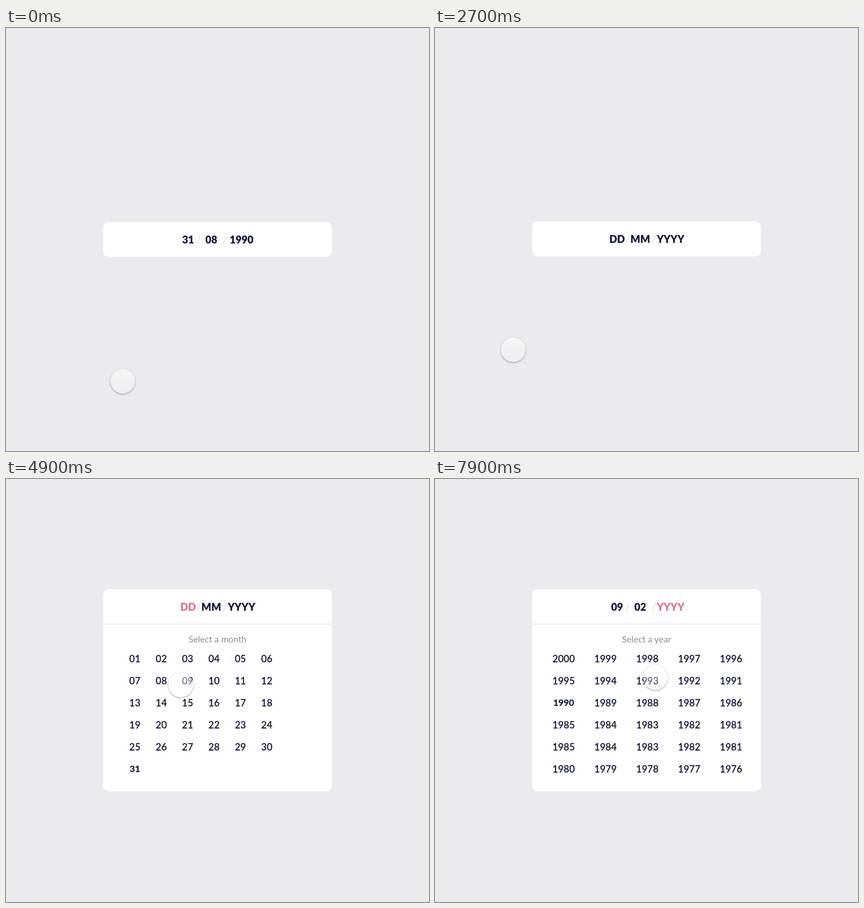
An HTML page for the animation above (8 s loop, 748x748 px).

```html
<!DOCTYPE html>
<html lang="en">
<head>
<meta charset="utf-8">
<title>Date picker</title>
<style>
:root { --ink: #12172f; --pink: #e2708a; }
html, body { margin: 0; width: 100%; height: 100%; overflow: hidden; background: #ebeaec; }
svg { display: block; width: 100vw; height: 100vh; }
text { font-family: Lato, "Open Sans", sans-serif; text-anchor: middle; fill: var(--ink); }

.card { fill: #fefdff; x: 171.5px; width: 405px; rx: 10px; animation: grow 8s infinite; }
.head { animation: lift 8s infinite; }
.head text { font-size: 18.2px; font-weight: 900; }
.head .slash { font-weight: 400; fill: #dcdbe0; }
@keyframes grow {
  0%, 29.99% { y: 343px; height: 62px; }
  30%, 41.875% { y: 342px; height: 62px; animation-timing-function: ease; }
  51.25%, 100% { y: 195px; height: 357.3px; }
}
@keyframes lift {
  0%, 29.99% { transform: translateY(343px); }
  30%, 41.875% { transform: translateY(342px); animation-timing-function: ease; }
  51.25%, 100% { transform: translateY(195px); }
}

/* header fields: hard swaps of text, soft changes of colour */
.past { animation: past 8s step-end infinite; }
.blank { animation: blank 8s step-end infinite; }
.dd { animation: dd 8s step-end infinite, ddTint 8s linear infinite; }
.day { animation: day 8s step-end infinite, dayTint 8s linear infinite; }
.mm { animation: mm 8s step-end infinite, mmTint 8s linear infinite; }
.month { animation: month 8s step-end infinite, monthTint 8s linear infinite; }
.yyyy { animation: yearTint 8s linear infinite; }
@keyframes past { 0% { opacity: 1; } 22.5%, 100% { opacity: 0; } }
@keyframes blank { 0% { opacity: 0; } 22.5%, 100% { opacity: 1; } }
@keyframes dd { 0% { opacity: 1; } 67.5%, 100% { opacity: 0; } }
@keyframes day { 0% { opacity: 0; } 67.5%, 100% { opacity: 1; } }
@keyframes mm { 0% { opacity: 1; } 88.75%, 100% { opacity: 0; } }
@keyframes month { 0% { opacity: 0; } 88.75%, 100% { opacity: 1; } }
@keyframes ddTint { 0%, 47.5% { fill: var(--ink); } 51.25%, 100% { fill: var(--pink); } }
@keyframes dayTint { 0%, 75.6% { fill: var(--pink); } 78.75%, 100% { fill: var(--ink); } }
@keyframes mmTint { 0%, 75.6% { fill: var(--ink); } 78.75%, 100% { fill: var(--pink); } }
@keyframes monthTint { 0%, 93.75% { fill: var(--pink); } 97%, 100% { fill: var(--ink); } }
@keyframes yearTint { 0%, 93.75% { fill: var(--ink); } 97%, 100% { fill: var(--pink); } }

/* panels */
.cells text { font-size: 16.8px; font-weight: 500; letter-spacing: .2px; stroke: var(--ink); stroke-width: .25px; }
.months text { font-size: 16px; letter-spacing: .45px; }
.cells .now { font-size: 16px; font-weight: 700; letter-spacing: 0; }
.cells .pick text { fill: #fff; stroke: #fff; }
.pick rect { fill: #f0748e; rx: 3px; }
.label { font-size: 15.7px; fill: #8e8c93; }
.panel { animation: panel 8s linear infinite; }
.days { animation: days 8s linear infinite; }
.months { animation: months 8s linear infinite; }
.years { animation: years 8s linear infinite; }
.pickDay { animation: pickDay 8s linear infinite; }
.pickMonth { animation: pickMonth 8s linear infinite; }
.askMonth { animation: askMonth 8s linear infinite; }
@keyframes panel { 0%, 47.5% { opacity: 0; } 51.25%, 100% { opacity: 1; } }
@keyframes days { 0%, 75.6% { opacity: 1; } 78.75%, 100% { opacity: 0; } }
@keyframes months { 0%, 75.6% { opacity: 0; } 79.4%, 93.75% { opacity: 1; } 96.5%, 100% { opacity: 0; } }
@keyframes years { 0%, 94% { opacity: 0; } 97.5%, 100% { opacity: 1; } }
@keyframes pickDay { 0%, 67.5% { opacity: 0; } 71.25%, 100% { opacity: 1; } }
@keyframes pickMonth { 0%, 88.2% { opacity: 0; } 90.7%, 100% { opacity: 1; } }
@keyframes askMonth { 0%, 93.75% { opacity: 1; } 96.5%, 100% { opacity: 0; } }

.cursor {
  position: absolute; left: -2.941vw; top: -2.941vh; width: 5.882vw; height: 5.882vh; border-radius: 50%;
  background: linear-gradient(rgba(255,255,255,.58), rgba(255,255,255,.2));
  box-shadow: 0 0 1.5px rgba(0,0,0,.28), 0 1.5px 3px rgba(0,0,0,.27);
  animation: roam 8s ease-in-out infinite;
}
@keyframes roam {
  0% { transform: translate(206.5px, 624.5px); }
  7.5%, 36.25% { transform: translate(138.5px, 569px); }
  42.5%, 55% { transform: translate(221px, 382.5px); }
  65%, 81.25% { transform: translate(345px, 356.5px); }
  87.5%, 100% { transform: translate(389.5px, 351px); }
}
</style>
</head>
<body>
<svg viewBox="0 0 748 748">
  <rect class="card"/>
  <g class="head">
    <text class="slash" x="340.5" y="38">/</text>
    <text class="slash" x="387" y="38">/</text>
    <g class="past">
      <text x="322" y="38">31</text><text x="363" y="38">08</text><text x="416.5" y="38">1990</text>
    </g>
    <g class="blank">
      <text class="dd" x="322" y="38">DD</text><text class="day" x="322" y="38">09</text>
      <text class="mm" x="363" y="38">MM</text><text class="month" x="363" y="38">02</text>
      <text class="yyyy" x="416.5" y="38">YYYY</text>
    </g>
  </g>
  <g class="panel">
    <path d="M171.5 256.5h405" stroke="#e3e2e5"/>
    <text class="label askMonth" x="374" y="288.5">Select a month</text>
    <text class="label years" x="374" y="288.5">Select a year</text>
    <g class="cells days"></g>
    <g class="cells months"></g>
    <g class="cells years"></g>
  </g>
</svg>
<div class="cursor"></div>
<script>
const range = (n, fn) => Array.from({ length: n }, (_, i) => fn(i));

function fillGrid(name, items, { cols, x, y, dx, dy, now, pick = "" }) {
  const cells = items.map((item, i) => {
    const current = item === now;
    const cy = y + Math.floor(i / cols) * dy - (current ? 1 : 0);
    return `<text x="${x + (i % cols) * dx}" y="${cy}"${current ? ' class="now"' : ""}>${item}</text>`;
  });
  document.querySelector(".cells." + name).innerHTML = cells.join("") + pick;
}

fillGrid("days", range(31, i => String(i + 1).padStart(2, "0")), {
  cols: 6, x: 228, y: 324, dx: 46.65, dy: 39, now: "31",
  pick: `<g class="pick pickDay"><rect x="305.5" y="341.5" width="31.5" height="31.5"/>
    <text x="321.3" y="362">09</text></g>`
});

fillGrid("months", ["January", "February", "March", "April", "May", "June", "July",
  "August", "September", "October", "November", "December"], {
  cols: 3, x: 249.2, y: 352, dx: 124.7, dy: 46.7, now: "August",
  pick: `<g class="pick pickMonth"><rect x="319.5" y="328" width="110" height="39.3"/>
    <text x="374" y="352">February</text></g>`
});

const firstYears = [2000, 1995, 1990, 1985, 1985, 1980];
fillGrid("years", firstYears.flatMap(first => range(5, i => first - i)), {
  cols: 5, x: 227.6, y: 324, dx: 74, dy: 39, now: 1990
});
</script>
</body>
</html>
```
